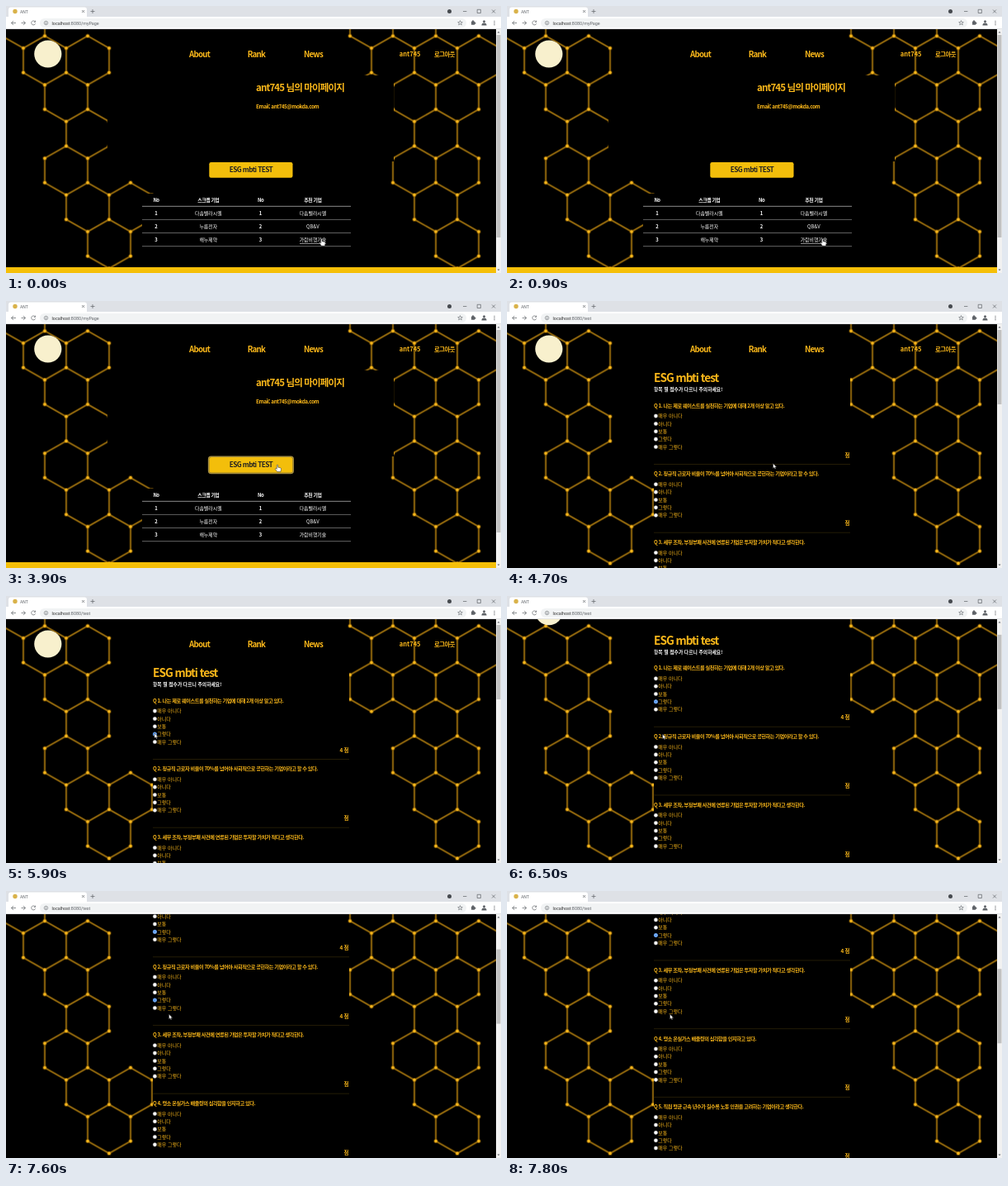
Animation of 600 by 323 pixels, one loop 8000 ms. Source, as an HTML page:

```html
<!DOCTYPE html>
<html lang="ko">
<head>
<meta charset="utf-8">
<style>
html, body { margin: 0; width: 100%; height: 100%; overflow: hidden; background: #000; }
svg { display: block; width: 600px; height: 323px; }
text { font-family: "Noto Sans CJK KR", "Noto Sans CJK", sans-serif; white-space: pre; }
.b { font-weight: 700; }
.m { font-weight: 500; }
.k { font-weight: 900; }
.tight { letter-spacing: -.075em; }
.ui { font-family: Roboto, "Open Sans", sans-serif; }
</style>
</head>
<body>
<svg id="stage" viewBox="0 0 600 323"></svg>
<script>
const GOLD = '#fbb81a', INK = '#5f6368';
const $ = id => document.getElementById(id);

const rect = (x, y, w, h, fill, more = '') =>
  `<rect x="${x}" y="${y}" width="${w}" height="${h}" fill="${fill}" ${more}/>`;
const circle = (x, y, r, fill, more = '') =>
  `<circle cx="${x}" cy="${y}" r="${r}" fill="${fill}" ${more}/>`;
const line = (d, color, width = 1, more = '') =>
  `<path d="${d}" fill="none" stroke="${color}" stroke-width="${width}" ${more}/>`;
// y is the vertical middle of the text
const text = (x, y, str, size, fill, cls = '', anchor = 'start') =>
  `<text x="${x}" y="${y + size * .36}" font-size="${size}" fill="${fill}" class="${cls}" text-anchor="${anchor}">${str}</text>`;

// Honeycomb: one string per row, each digit the half-step column of a cell
function comb(x0, rows) {
  const r = 29.6, nodes = new Set();
  let d = '';
  rows.forEach((cols, row) => [...cols].forEach(col => {
    const pts = Array.from({ length: 6 }, (_, i) => {
      const a = i * Math.PI / 3;
      return [x0 + col * 26 + 30 * Math.sin(a), 65.8 + (row - 1) * 1.5 * r - r * Math.cos(a)]
        .map(v => v.toFixed(1)).join(' ');
    });
    pts.forEach(p => nodes.add(p));
    d += `M${pts.join('L')}Z`;
  }));
  const dots = [...nodes].map(p => `M${p}h0`).join('');
  const round = 'stroke-linecap="round"';
  return line(d, '#4a3405', 3, 'opacity=".7"') + line(d, '#946a0e', 1.5) +
    line(dots, '#a87508', 5.4, round + ' opacity=".5"') + line(dots, '#f8b71c', 3.6, round);
}
const backdrop = rect(0, 28, 594, 295, '#000') +
  comb(21, ['0', '13', '2', '3', '2', '35', '4']) +
  comb(417, ['13', '246', '135', '4', '35', '4', '5']);

const header = circle(50.8, 58, 16.6, '#f8f0cd') +
  ['About', 'Rank', 'News'].map((s, i) => text(234.5 + i * 69, 58.3, s, 9.7, GOLD, 'b tight', 'middle')).join('') +
  text(489.7, 58.3, 'ant745', 7.5, GOLD, 'b', 'middle') +
  text(531.5, 58.3, '로그아웃', 7.4, GOLD, 'b tight', 'middle');

function myPage() {
  const rows = [
    ['No', '스크랩 기업', 'No', '추천 기업'],
    [1, '다솜벨라시엘', 1, '다솜벨라시엘'],
    [2, '누름전자', 2, 'QB&amp;V'],
    [3, '해누제약', 3, '가람비행기술']
  ];
  const table = rows.map((cells, r) => cells.map((s, c) =>
    text(182 + c * 63.3, 235 + r * 16, s, 5.9, '#fff', r ? (c % 2 ? 'm' : 'b') : 'k tight', 'middle')).join('') +
    line(`M165 ${242.3 + r * 16.1}H418`, r ? '#8a8a8a' : '#c8c8c8', .7)).join('');
  return rect(123, 84, 347, 104, '#000') + rect(165, 227, 253, 64, '#000') + header +
    text(303, 99, 'ant745 님의 마이페이지', 11.5, GOLD, 'b tight') +
    text(303, 121.5, 'Email: ant745@mokda.com', 6.4, GOLD, 'b tight') +
    rect(246.3, 189, 101.2, 18.8, '#f3be0b', 'rx="2.3"') +
    rect(245.6, 188.3, 102.6, 20.2, 'none', 'id="focus" rx="3" stroke="#ffdb62" stroke-opacity=".65" stroke-width="1.5"') +
    text(297, 198.5, 'ESG mbti TEST', 8.3, '#222', 'b tight', 'middle') +
    table + line('M356 287.4H388', '#fff', .6, 'id="underline"') + rect(0, 316, 594, 7, '#f5bf08');
}

const questions = [
  '나는 제로 웨이스트를 실천하는 기업에 대해 2개 이상 알고 있다.',
  '정규직 근로자 비율이 70%를 넘어야 사회적으로 공헌하는 기업이라고 할 수 있다.',
  '세무 조작, 부정부패 사건에 연류된 기업은 투자할 가치가 적다고 생각한다.',
  '평소 온실가스 배출량의 심각함을 인지하고 있다.',
  '직원 평균 근속 년수가 길수록 노동 인권을 고려하는 기업이라고 생각한다.'
];
const options = ['매우 아니다', '아니다', '보통', '그렇다', '매우 그렇다'];

function testPage() {
  let out = header + text(178, 93, 'ESG mbti test', 13.7, GOLD, 'b tight') +
    text(178, 107, '항목 별 점수가 다르니 주의하세요!', 5.8, '#fff', 'b');
  questions.forEach((q, n) => {
    const y = 126.5 + n * 82.7;
    out += text(178, y, `Q ${n + 1}. ${q}`, 6.2, GOLD, 'b tight');
    options.forEach((o, i) => {
      const oy = y + 12.6 + i * 9.35;
      out += circle(180.4, oy, 2.3, '#fff', 'stroke="#777" stroke-width=".4"') + text(183.2, oy, o, 6, GOLD, 'm');
    });
    out += text(415.5, y + 59.8, '점', 6.4, GOLD, 'b', 'end') +
      line(`M178 ${y + 71}H416`, '#2e2408', .8) +
      `<g id="pick${n}">` + circle(180.4, y + 40.6, 2, '#fff', 'stroke="#1a73e8" stroke-width=".9"') +
      circle(180.4, y + 40.6, 1.1, '#1a73e8') + text(404.5, y + 59.8, '4', 6.4, GOLD, 'b') + '</g>';
  });
  return out;
}

function browser() {
  const icon = (d, width = .7) => line(d, INK, width);
  return rect(0, 0, 600, 14, '#dee1e6') + rect(3, 1.5, 95, 14, '#fff', 'rx="3"') + rect(0, 13, 600, 15, '#fff') +
    circle(11, 6.5, 2.7, '#d9b24a') + text(17, 6.7, 'ANT', 5, INK, 'ui') +
    icon('M92 5l3 3m0-3l-3 3M102.5 6.5h5M105 4v5') + circle(537.5, 6.5, 2.5, '#45494e') +
    icon('M554 6.5h4.4M571.2 4.3h4.2v4.2h-4.2zM589 4.5l4 4m0-4l-4 4') +
    rect(41, 15, 517, 11, '#f1f3f4', 'rx="5.5"') +
    icon('M12 20.5H6.5m2.5-2.5l-2.5 2.5 2.5 2.5M18.5 20.5h5m-2.5-2.5l2.5 2.5-2.5 2.5') +
    icon('M35.3 19a2.5 2.5 0 1 0 .3 2.3m0-3.7v1.8h-1.8') +
    circle(48.5, 20.5, 2.2, 'none', `stroke="${INK}" stroke-width=".6"`) + icon('M48.5 20v1.8m0-2.9v.5', .6) +
    `<text x="55.5" y="22.5" font-size="5.4" class="ui" fill="${INK}"><tspan fill="#333">localhost</tspan>:8080/<tspan id="path"></tspan></text>` +
    icon('M550.5 17.6l.8 2h2l-1.6 1.3.6 2-1.8-1.2-1.8 1.2.6-2-1.6-1.3h2z', .6) +
    rect(564, 18.6, 4.2, 4.2, INK, 'rx=".6"') + circle(566, 18.3, 1, INK) + circle(568.5, 20.7, 1, INK) +
    circle(579.5, 18.7, 1.5, INK) + `<path d="M576.4 23.5q0-3 3.1-3t3.1 3z" fill="${INK}"/>` +
    [-1, 0, 1].map(i => circle(592, 20.5 + i * 2.2, .65, INK)).join('') +
    line('M0 27.6H600', '#d5d7da', .7) +
    rect(594, 28, 6, 295, '#f1f1f1') + rect(594.6, 35, 4.8, 90, '#c1c1c1', 'id="thumb"') +
    `<path d="M595.5 32.5h3l-1.5-1.7zM595.5 318.5h3l-1.5 1.7z" fill="${INK}"/>`;
}

const pointers = `<g fill="#fff" stroke="#222" stroke-width=".5">
  <path id="arrow" d="M0 0V6L1.4 4.8 2.3 6.8 3.3 6.3 2.4 4.4H4.3Z"/>
  <path id="hand" d="M-.7 .5Q0-.4 .7 .5V3.2L4 4Q4.6 4.2 4.5 5.2L4 8.6H-.2L-2.7 5.3Q-2.6 4.2-1.6 4.6L-.7 5.4Z"/></g>`;

$('stage').innerHTML =
  '<clipPath id="view"><rect y="28" width="594" height="295"/></clipPath><g clip-path="url(#view)">' +
  backdrop + `<g id="my">${myPage()}</g><g id="test">` + rect(178, 80, 238, 243, '#000') +
  `<g id="scroll">${testPage()}</g></g></g>` + browser() + `<g id="cursor">${pointers}</g>`;

const clamp = (v, max = 1) => Math.min(max, Math.max(0, v));
// Pointer moves: start, duration, destination
const moves = [
  [1700, 800, 329, 198], [4000, 300, 322.5, 196.5], [4800, 300, 202, 195], [5400, 400, 180, 166],
  [5900, 100, 188.5, 167], [6600, 400, 180, 131], [7300, 300, 197.5, 149]
];
function cursorAt(t) {
  let x = 382.5, y = 281.5;
  for (const [start, length, toX, toY] of moves) {
    const p = 1 - (1 - clamp((t - start) / length)) ** 3;
    x += (toX - x) * p;
    y += (toY - y) * p;
  }
  return [x, y];
}
const show = (id, on) => $(id).setAttribute('display', on ? 'inline' : 'none');

function draw(now) {
  const t = Math.floor(now % 8000 / 100) * 100;
  const onTest = t >= 4000;
  const clicks = clamp((t - 6400) / 100, 3) + clamp((t - 7600) / 100, 2);
  const scroll = 39.25 * clicks;
  const hand = t < 1800 || (t >= 2100 && !onTest);
  show('my', !onTest);
  show('test', onTest);
  show('underline', t < 1800);
  show('focus', t >= 3900);
  questions.forEach((_, n) => show('pick' + n, n < 2 && t >= 5900 + n * 1300));
  show('hand', hand);
  show('arrow', !hand);
  $('path').textContent = onTest ? 'test' : 'myPage';
  $('thumb').setAttribute('y', 35 + scroll * .302);
  $('thumb').setAttribute('height', onTest ? 90 : 245);
  $('scroll').setAttribute('transform', `translate(0 ${-scroll})`);
  $('cursor').setAttribute('transform', `translate(${cursorAt(t)})`);
  requestAnimationFrame(draw);
}
requestAnimationFrame(draw);
</script>
</body>
</html>
```
